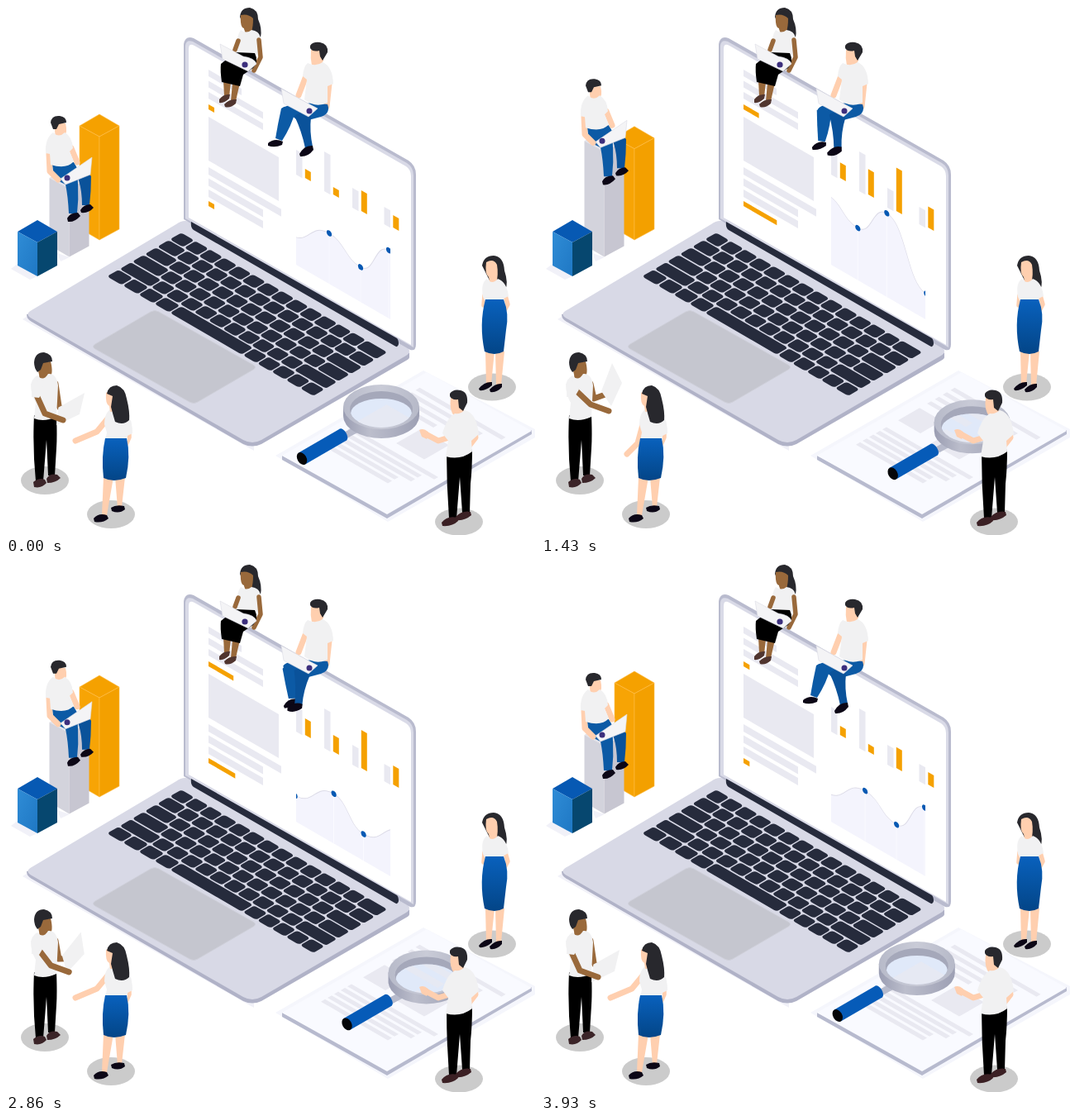
These frames come from a looping animation (640 px wide and 640 px high, 4 s). An HTML page:

```html
<!DOCTYPE html>
<html lang="en">
<head>
<meta charset="utf-8">
<title>Isometric analytics team</title>
<style>
html, body { margin: 0; width: 100%; height: 100%; overflow: hidden; background: #fff; }
svg { display: block; width: 640px; height: 640px; }
.skin { fill: #ffcfaf; } .brown { fill: #99693b; }
.hair { fill: #28282d; } .black { fill: #000; } .shirt { fill: #f1f1f2; }
.jeans { fill: #0c5aa5; } .jeans2 { fill: #0a529a; }
.shoe { fill: #0c0716; } .lid { fill: #f4f4f6; stroke: #dcdce4; stroke-width: .6; }
.mark { fill: #3c2f7d; } .skirt { fill: url(#skirt); }
.shade { fill: #cbcbcb; } .grey { fill: #e9e9f1; } .orange { fill: #f5a100; }
.limb { fill: none; stroke: #ffcfaf; stroke-width: 7; stroke-linecap: round; stroke-linejoin: round; }
.dark { stroke: #99693b; } .thin { stroke-width: 5.5; }
</style>
</head>
<body>
<svg viewBox="0 0 640 640">
<defs>
  <linearGradient id="skirt" x2="0" y2="1"><stop offset="0" stop-color="#0961bd"/><stop offset="1" stop-color="#034587"/></linearGradient>
  <linearGradient id="blue" x2="1" y2="1"><stop offset="0" stop-color="#2f8cd6"/><stop offset="1" stop-color="#1f78c4"/></linearGradient>
  <linearGradient id="rim" x2="1" y2="0"><stop offset="0" stop-color="#9a9db2"/><stop offset=".35" stop-color="#bcbecc"/><stop offset="1" stop-color="#9da0b4"/></linearGradient>
  <linearGradient id="face" x2="1" y2="0"><stop offset="0" stop-color="#b7bac9"/><stop offset=".5" stop-color="#c9cbd7"/><stop offset="1" stop-color="#b6b9c8"/></linearGradient>
  <clipPath id="chart"><path d="M351 180L465 200V379L351 313Z"/></clipPath>
  <clipPath id="hole"><ellipse cx="454" cy="488" rx="38" ry="22"/></clipPath>
  <clipPath id="glass"><ellipse cx="454" cy="493" rx="37" ry="18"/></clipPath>
</defs>

<!-- columns -->
<path fill="#f1f1f8" d="M6 318L14 312L38 327L29 331ZM62 299L77 304L66 309Z"/>
<g id="gold" stroke="#ffbd45" stroke-width=".6"></g>
<g id="silver"></g>
<path fill="#0759b3" d="M38 259L62 273L38 286L14 273Z"/>
<path fill="url(#blue)" d="M14 273L38 286V327L14 314Z"/>
<path fill="#06476f" d="M62 273L38 286V327L62 314Z"/>

<!-- laptop -->
<path fill="#f1f1f8" d="M20 379L34 370L300 524V538Z"/>
<path fill="#b0b2c7" d="M31 372L206 268L484 416L488 420V425Q488 427 484 429L309 530Q298 535 287 530L31 382Q25 379 25 373Z"/>
<path fill="#d8d9e6" d="M31 368L206 264Q214 258 222 261L484 411Q492 418 484 423L309 525Q298 531 287 525L31 378Q22 373 31 368Z"/>
<path fill="#b9bbce" d="M215 46Q217 35 227 39L487 187Q496 193 496 204V409Q496 418 489 416L215 258Z"/>
<path fill="#d9dae7" d="M217 48Q218 40 226 43L485 190Q493 195 493 205V413L217 257Z"/>
<path fill="#fff" d="M221 52Q221 44 228 48L484 194Q490 198 490 206V410L221 256Z"/>
<path fill="#262b3c" d="M224 261L473 402Q475 404 475 409Q474 414 470 411L227 271Q223 268 224 261Z"/>
<g id="keys" fill="#262b3c" transform="matrix(17.3 10.03 -15.2 8.95 212 273.5)"></g>
<path fill="#c5c6cf" stroke="#cfd0da" d="M108 409L175 370Q180 367 185 370L299 434Q304 437 299 440L232 479Q227 482 222 479L108 415Q103 412 108 409Z"/>
<g id="screen"></g>
<g clip-path="url(#chart)"><g id="wave"></g></g>

<!-- woman on the lid -->
<path class="hair" d="M283 13Q284 2 295 2Q305 4 305 16Q310 27 308 38L290 32Z"/>
<path class="brown" d="M284 11Q293 9 299 15Q299 25 297 31L290 35L288 27Q283 26 284 11Z"/>
<path class="shirt" d="M284 29Q291 34 297 29Q306 30 308 38L304 60L279 57L282 43Q278 38 284 29Z"/>
<path class="limb dark thin" d="M306 41L308 62L300 78M281 42L277 53"/>
<path class="brown" d="M263 90L272 92L270 110L264 109ZM274 93L283 93L278 115L272 115Z"/>
<path class="black" d="M278 56L301 57Q306 67 299 75L287 83L283 97L261 92Q259 78 260 70Z"/>
<path class="lid" d="M259 46L287 61Q301 63 303 70L293 79L262 64Z"/>
<circle class="mark" cx="289" cy="71" r="3.6"/>
<path fill="#50352f" d="M258 113Q263 106 271 107L270 112Q264 118 258 117ZM264 119Q270 112 279 113L278 118Q271 124 265 122Z"/>

<!-- man on the lid -->
<path class="limb" d="M364 82L354 108M391 94L388 122L378 130"/>
<path class="jeans" d="M372 117L389 119Q393 130 381 134L366 138L354 139L335 125Q338 120 346 120Z"/>
<g id="legL">
  <path class="jeans" d="M333 124Q341 118 350 127Q346 144 334 163L326 160Q329 142 333 124Z"/>
  <path class="shoe" d="M317 166Q325 159 335 164L334 168Q325 172 317 169Z"/>
</g>
<g id="legR">
  <path class="jeans2" d="M349 133Q358 125 369 134Q367 152 371 170L362 172Q358 152 349 133Z"/>
  <path class="shoe" d="M355 179Q361 168 371 169L372 174Q365 183 356 182Z"/>
</g>
<path class="skin" d="M369 53L382 52L384 66L380 73L370 72Q368 63 369 53Z"/>
<path class="hair" d="M368 48Q371 43 380 44Q390 46 389 56L383 66L380 61L379 54Q371 56 368 51Z"/>
<path class="shirt" d="M365 69Q375 74 383 68Q395 73 396 94L389 97L389 117Q374 124 361 113L364 89L359 85Q360 73 365 69Z"/>
<path class="lid" d="M333 100L362 116L377 124L366 134L336 118Z"/>
<circle class="mark" cx="367" cy="127" r="3.5"/>

<!-- man on the silver column -->
<g id="sitter">
  <path class="jeans2" d="M82 197Q98 197 103 206Q103 224 101 241L92 241Q92 224 88 211Z"/>
  <path class="jeans" d="M56 192L82 189L90 203Q86 205 87 216Q88 234 86 251L76 251Q75 230 72 216L58 209Z"/>
  <path class="shoe" d="M74 257Q77 250 87 250L90 254Q83 262 75 261ZM90 247Q94 240 102 240L106 244Q100 251 91 250Z"/>
  <path class="limb" d="M52 179L53 200L63 210M79 172L86 189"/>
  <path class="skin" d="M58 142L72 142Q75 154 70 157L69 161L60 160Z"/>
  <path class="hair" d="M54 141Q55 132 65 133Q73 134 73 141L64 143L61 149L57 149Z"/>
  <path class="shirt" d="M57 153Q64 160 71 153Q80 158 81 172L77 176L82 188Q73 198 54 192L53 179L48 178Q47 160 57 153Z"/>
  <path class="lid" d="M66 209L104 183L102 204L72 216Z"/>
  <circle class="mark" cx="74" cy="208" r="3.5"/>
</g>

<!-- standing woman, right -->
<ellipse class="shade" cx="588" cy="461" rx="29" ry="16.5"/>
<path class="hair" d="M576 314Q578 302 590 302Q602 303 603 320Q608 335 604 344L588 338Z"/>
<path class="skin" d="M581 310Q590 305 594 313Q596 325 593 336L586 338L584 328Q579 324 581 310Z"/>
<path class="skin" d="M580 418H591L587 457L581 459ZM592 418H603L599 459L593 459Z"/>
<path class="limb thin" d="M604 350L607 361L601 372M579 350L578 362"/>
<path class="shirt" d="M582 330Q588 338 595 330Q606 334 608 351L602 354V358H580L577 352Q574 335 582 330Z"/>
<path class="skirt" d="M580 355H602Q609 372 605 392L602 418Q591 424 579 418Q572 385 580 355Z"/>
<path class="shoe" d="M572 463Q579 454 588 455L588 459Q580 466 573 465ZM585 464Q592 456 600 457L600 461Q594 468 586 467Z"/>

<!-- report -->
<path fill="#f5f6fc" d="M326 544L505 441L640 512V522L462 624Z"/>
<path fill="#b7bace" d="M334 544L461 612L636 513V518L461 620L334 549Z"/>
<path fill="#f9faff" d="M334 544L509 443L636 514L461 615Z"/>
<g id="text" class="grey"></g>

<!-- magnifier -->
<g id="lens">
  <path fill="none" stroke="#b7bacb" stroke-width="8" d="M404 523L430 509"/>
  <path fill="none" stroke="#065bb8" stroke-width="16" d="M358 547.5L408 518.5"/>
  <ellipse fill="#065bb8" cx="408" cy="518.5" rx="4" ry="8" transform="rotate(-30 408 518.5)"/>
  <ellipse fill="#050608" cx="358" cy="547.5" rx="5.5" ry="8" transform="rotate(-30 358 547.5)"/>
  <path fill="url(#rim)" d="M408 485V496A46 27 0 0 0 500 496V485Z"/>
  <ellipse fill="url(#face)" cx="454" cy="485" rx="46" ry="27"/>
  <g clip-path="url(#hole)">
    <path fill="#a5a8ba" d="M410 460H500V520H410Z"/>
    <g clip-path="url(#glass)">
      <path fill="#e0e9f9" d="M410 460H500V520H410Z"/>
      <use id="zoom" href="#text" style="fill:#c6d0e6" opacity=".75"/>
    </g>
  </g>
</g>

<!-- man with the magnifier -->
<ellipse class="shade" cx="548" cy="624" rx="29" ry="16.5"/>
<path class="black" d="M533 540L564 537Q564 560 562 578L561 613L552 613L549 570L545 620L536 620Q533 580 533 540Z"/>
<path fill="#3b2024" d="M527 625Q534 616 546 619L547 623Q540 630 528 629ZM544 618Q552 610 562 612L563 616Q555 623 545 622Z"/>
<path class="limb" d="M536 522L523 526L506 517M567 515L568 522L561 531"/>
<path class="skin" d="M500 513Q507 510 512 517L509 524L503 521Z"/>
<path class="skin" d="M538 474L551 473L554 489L549 498L542 496Q536 488 538 474Z"/>
<path class="hair" d="M537 469Q541 463 550 465Q559 467 558 480L553 490L548 486L547 476Q539 477 537 472Z"/>
<path class="shirt" d="M543 493Q550 494 555 489Q569 492 572 518L563 526L564 539Q550 550 532 545L535 526L528 517Q533 499 543 493Z"/>

<!-- man with the sheet -->
<ellipse class="shade" cx="47" cy="574" rx="29" ry="17"/>
<path class="black" d="M34 495L61 495Q62 520 61 535L59 568L51 568L49 525L45 575L36 575Q32 535 34 495Z"/>
<path fill="#3b2428" d="M33 576Q40 570 47 573L49 577Q43 584 34 582ZM49 572Q53 565 62 567L66 571Q60 577 50 577Z"/>
<path class="brown" d="M37 432L54 430Q58 446 52 450L50 457L41 454L40 446Z"/>
<path class="hair" d="M34 431Q35 419 46 419Q56 421 56 430L45 432L42 440L38 443Q34 438 34 431Z"/>
<path class="limb dark" id="armFar"/>
<path class="shirt" d="M38 447Q45 455 51 445Q61 444 63 459L61 497Q46 504 34 499L36 480Q30 470 30 458Q32 450 38 447Z"/>
<path id="sheet" class="shirt" d="M73 466L86 432L98 456L85 484Z"/>
<path class="limb dark" id="armNear"/>
<path class="shirt" d="M32 452Q43 453 46 464L40 474L31 473Z"/>

<!-- woman facing him -->
<ellipse class="shade" cx="127" cy="615" rx="29" ry="17"/>
<path class="skin" d="M118 570H130L122 616L116 616ZM132 570H144L140 606L135 607Z"/>
<path class="shoe" d="M106 620Q112 613 122 616L124 620Q117 626 107 624ZM127 607Q133 603 143 605L144 609Q137 615 128 611Z"/>
<path class="limb thin" d="M149 514L149 522L145 531"/>
<path class="limb" id="reach"/>
<path class="shirt" d="M126 488L143 490Q153 496 153 517L147 520V526H120L122 516L119 506Q119 493 126 488Z"/>
<path class="skirt" d="M120 523H146Q151 544 145 571Q130 577 118 571Q115 545 120 523Z"/>
<path class="skin" d="M121 468Q131 462 134 472L134 490L126 491L125 484Q120 482 121 468Z"/>
<path class="hair" d="M122 469Q124 459 134 459Q144 462 146 475Q150 491 149 501Q142 508 132 503Q129 493 127 485L129 472Z"/>
</svg>

<script>
const $ = id => document.getElementById(id);
const K = .577, CYCLE = 3942, FRAME = 4000 / 56;
const NS = 'http://www.w3.org/2000/svg';

const add = (parent, tag, attrs) => {
  const el = parent.appendChild(document.createElementNS(NS, tag));
  for (const k in attrs) el.setAttribute(k, attrs[k]);
  return el;
};
const move = (id, transform) => $(id).setAttribute('transform', transform);
const trace = (id, d) => $(id).setAttribute('d', d);

// Rises 0 to 1 from a to b, holds, falls back from c to d.
const ramp = (t, a, b, c, d) =>
  Math.max(0, Math.min(1, (t - a) / (b - a), (d - t) / (d - c)));
const peak = (t, at) => ramp(t, 0, at * CYCLE, at * CYCLE, CYCLE);

// Parallelogram lying in the screen plane
const slab = (x, y, w, h) => `M${x} ${y}l${w} ${w * K}v${h}l${-w} ${-w * K}Z`;

// Keyboard in key units: each row is staggered, its last key fills the rest.
const key = (x, y, w) =>
  add($('keys'), 'rect', { x: x + .04, y: y + .05, width: w - .08, height: .9, rx: .2 });
for (let y = 0; y < 5; y++) {
  const first = 1 + .3 * y;
  key(0, y, first);
  let x = first;
  for (; x < 12.6 - .2 * y; x++) key(x, y, 1);
  key(x, y, 14.5 - x);
}
for (let i = 0; i < 4; i++) key(i * 1.1, 5, 1.1);
key(4.4, 5, 5.1);
for (let i = 0; i < 5; i++) key(9.5 + i, 5, 1);

// Page on the screen
const grey = (...box) => add($('screen'), 'path', { class: 'grey', d: slab(...box) });
for (let i = 0; i < 3; i++) {
  grey(245, 77 + 13.5 * i, i ? 66 : 40, 8);
  grey(245, 195 + 13.5 * i, i ? 66 : 88, 9);
}
grey(245, 134, 85, 53);

// Orange strips grow sideways, orange bars upwards.
const growing = [];
const orange = shape => growing.push([add($('screen'), 'path', { class: 'orange' }), shape]);
orange(t => slab(245, 119, 7 + 24 * peak(t, .75), 6));
orange(t => slab(245, 236, 7 + 46 * peak(t, .5), 6));
[
  { x: 351, pale: 30, low: 11, gain: 13, at: .6 },
  { x: 385, pale: 48, low: 9, gain: 24, at: .4 },
  { x: 419, pale: 24, low: 25, gain: 38, at: .5 },
  { x: 457.5, pale: 21, low: 15, gain: 14.5, at: .5 }
].forEach(({ x, pale, low, gain, at }, i) => {
  const foot = 208 + 20 * i;
  grey(x, foot - 4 - pale, 7.5, pale);
  orange(t => {
    const h = low + gain * peak(t, at);
    return slab(x + 10.8, foot - h, 7, h);
  });
});

// Report text: a runs down the page edge, b across it.
const paper = (a, b) => `${334 + a + b} ${544 + K * (a - b)}`;
const block = (a, b, a2, b2) => add($('text'), 'path', {
  d: `M${paper(a, b)}L${paper(a2, b)}L${paper(a2, b2)}L${paper(a, b2)}Z`
});
for (let i = 0; i < 5; i++) block(12, 35 + 8 * i, 93 + 12 * (i >> 1), 40 + 8 * i);
for (let i = 0; i < 4; i++) block(12, 121 + 9.5 * i, 62 + 18 * i, 126 + 9.5 * i);
block(12, 86, 39, 112);
block(56, 82, 90, 112);

// Scrolling line chart: key points of one period, repeated
const PERIOD = 322;
const knots = [[391, 275], [429, 294], [463, 254], [500, 273], [535, 235], [583, 305], [630, 276], [666, 304]];
const pts = [-1, 0, 1].flatMap(k => knots.map(([x, y]) => [x + k * PERIOD, y]));
const line = pts.map(([x, y], i) => {
  if (!i) return `M${x} ${y}`;
  const [px, py] = pts[i - 1], mid = (px + x) / 2;
  return `C${mid} ${py} ${mid} ${y} ${x} ${y}`;
}).join('');
add($('wave'), 'path', { d: `${line}V500H${pts[0][0]}Z`, fill: '#f4f4fd' });
for (const [x, y] of pts) add($('wave'), 'path', { d: `M${x} ${y}V500`, stroke: '#fbfbff', 'stroke-width': .8 });
add($('wave'), 'path', { d: line, fill: 'none', stroke: '#dddce8', 'stroke-width': .8 });
for (const [cx, cy] of pts) add($('wave'), 'ellipse', { cx, cy, rx: 3.1, ry: 3.4, fill: '#0759b3' });

// Column whose top face starts at y
function column(group, x, foot, fills) {
  const faces = fills.map(fill => add(group, 'path', { fill }));
  return y => [
    `M${x} ${y}l24 14l-24 13l-24 -13Z`,
    `M${x - 24} ${y + 14}L${x} ${y + 27}V${foot}l-24 -14Z`,
    `M${x + 24} ${y + 14}L${x} ${y + 27}V${foot}l24 -13Z`
  ].forEach((d, i) => faces[i].setAttribute('d', d));
}
const gold = column($('gold'), 113, 283, ['#f5a100', '#f7a405', '#f3a000']);
const silver = column($('silver'), 76.5, 303.5, ['#e3e3ea', '#d3d3dc', '#c7c6d1']);

function draw(t) {
  const up = ramp(t, 0, 1600, 1850, 3300);
  gold(131 + 16.5 * up);
  silver(194 - 50 * up);
  move('sitter', `translate(0 ${-50 * up})`);

  const s = -PERIOD * t / CYCLE;
  move('wave', `matrix(1 ${K} 0 1 ${s} ${K * (s - 391)})`);
  for (const [el, shape] of growing) el.setAttribute('d', shape(t));

  const swing = (1 - Math.cos(4 * Math.PI * t / CYCLE)) / 2;
  move('legL', `rotate(${-23 * swing} 344 122)`);
  move('legR', `rotate(${18 * swing} 359 130)`);

  const q = 1 - (1 - peak(t, .5)) ** 1.4, dx = 81 * q, dy = 29 * q ** 2.6;
  move('lens', `translate(${dx} ${dy})`);
  move('zoom', `translate(454 493) scale(1.6) translate(${-454 - dx} ${-493 - dy})`);

  const low = 1 - ramp(t, 150, 1430, 2500, 3300);
  move('sheet', `translate(${-8 * low} ${29 * low}) rotate(${40 * low} 85 459)`);
  trace('armNear', `M${40 - 3 * low} ${463 + 8 * low}L${60 - 13 * low} ${482 + 11 * low}l22 8`);
  trace('armFar', `M60 457L64 ${475 + 9 * low}L${86 - 16 * low} ${467 + 26 * low}`);

  const drop = ramp(t, 0, 800, 2200, 2800);
  trace('reach', `M124 ${498 + 5 * drop}L${110 + 7 * drop} ${515 + 14 * drop}L${84 + 20 * drop} ${526 + 16 * drop}`);
}

// Drawn at 14 steps per second
const start = performance.now();
function tick(now) {
  const t = Math.max(0, now - start) % 4000;
  draw(Math.floor((t + 5) / FRAME) % 56 * FRAME);
  requestAnimationFrame(tick);
}
draw(0);
requestAnimationFrame(tick);
</script>
</body>
</html>
```
